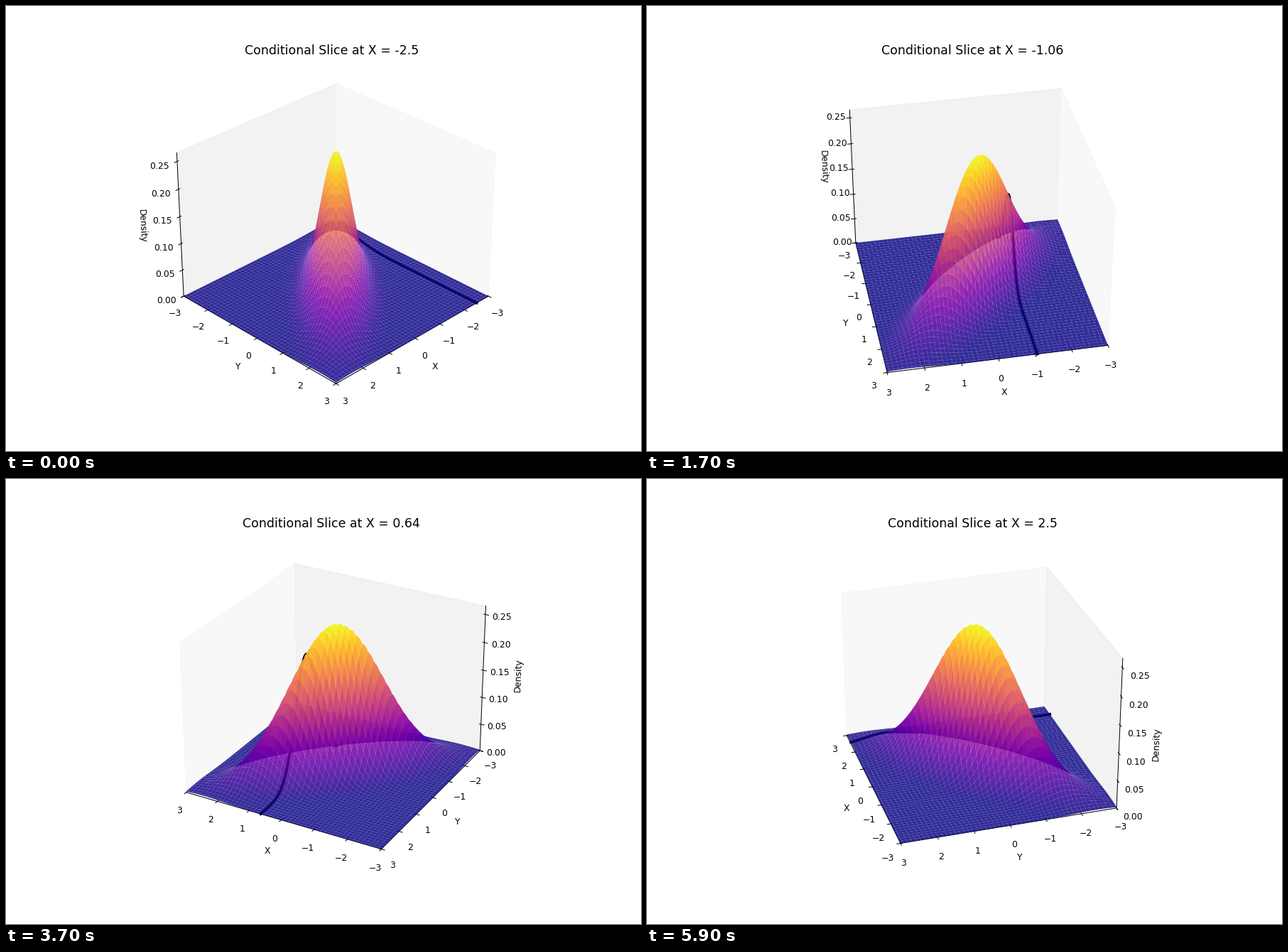
Write a matplotlib script that moves like this. It is 894 px wide and 626 px high and loops after 6000 ms.

```python
import matplotlib.pyplot as plt
import numpy as np
from matplotlib.animation import FuncAnimation

WIDTH, HEIGHT, DPI = 894, 626, 89.4
FRAMES, INTERVAL = 60, 100
RHO = 0.8

plt.rcParams["font.family"] = "DejaVu Sans"


def density(x, y):
    """Standard bivariate normal density with correlation RHO."""
    k = 1 - RHO**2
    q = (x**2 - 2 * RHO * x * y + y**2) / k
    return np.exp(-q / 2) / (2 * np.pi * np.sqrt(k))


axis = np.linspace(-3, 3, 100)
X, Y = np.meshgrid(axis, axis)
Z = density(X, Y)
slices = np.linspace(-2.5, 2.5, FRAMES)

fig = plt.figure(figsize=(WIDTH / DPI, HEIGHT / DPI), dpi=DPI)
ax = fig.add_subplot(projection="3d")
ax.plot_surface(X, Y, Z, cmap="plasma", alpha=0.85, linewidth=0, antialiased=True)
line, = ax.plot([], [], [], color="black", linewidth=3)

ax.set(xlim=(-3, 3), ylim=(-3, 3), zlim=(0, Z.max()),
       xlabel="X", ylabel="Y", zlabel="Density")
ax.grid(False)
title = ax.set_title("", fontsize=14)


def update(i):
    x = slices[i]
    line.set_data_3d(np.full_like(axis, x), axis, density(x, axis))
    title.set_text(f"Conditional Slice at X = {round(float(x), 2)}")
    ax.view_init(elev=30 + 5 * np.sin(i / 10), azim=45 + 2 * i)
    return line, title


anim = FuncAnimation(fig, update, frames=FRAMES, interval=INTERVAL,
                     repeat=True, repeat_delay=0)
plt.show()
```
